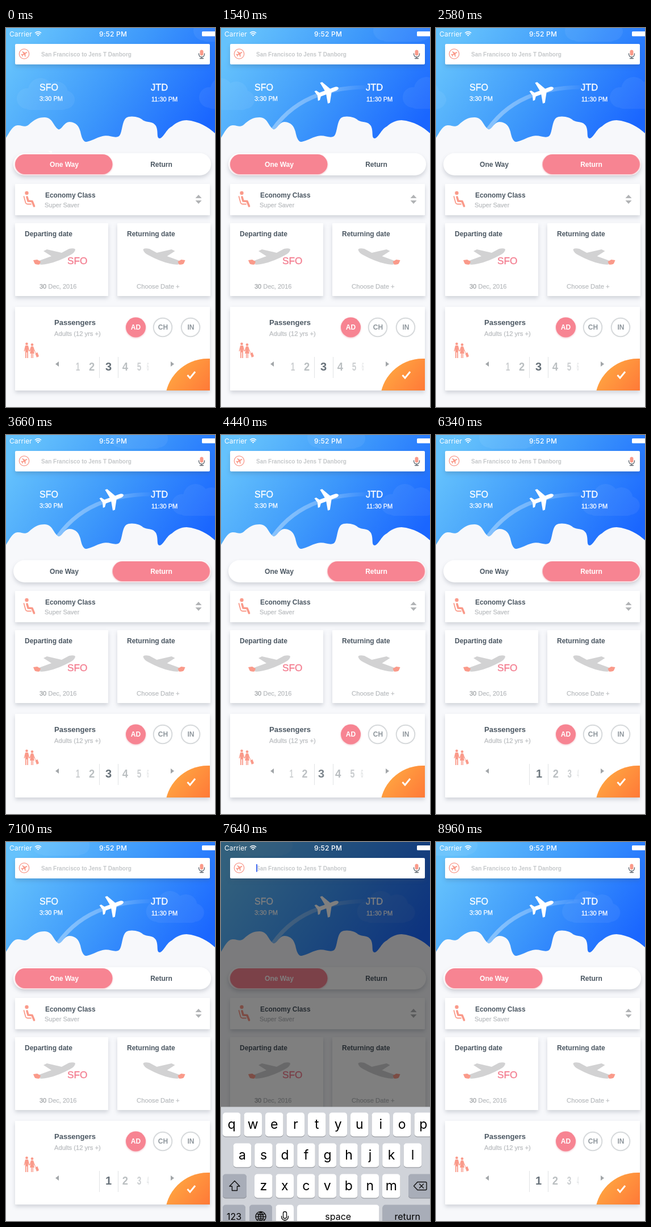
Recreate the animation shown at these times as an HTML page. Size 368 px wide and 666 px high, loop 8.98 s.

```html
<!DOCTYPE html>
<html lang="en">
<head>
<meta charset="utf-8">
<title>Flight booking</title>
<style>
@property --pos { syntax: "<number>"; inherits: true; initial-value: 3; }

html, body { margin: 0; width: 100%; height: 100%; overflow: hidden; background: #f7f8fb; }
svg { display: block; width: 368px; height: 666px; font-family: "Liberation Sans", Arial, sans-serif; }
text { white-space: pre; }

.b { font-weight: 700; }
.mid { text-anchor: middle; }
.dark { fill: #4b5762; }
.soft { fill: #b9bcbf; font-size: 11px; stroke: #b9bcbf; stroke-width: .25px; }
.salmon { fill: #fa9a8a; }
.pink { fill: #f78492; filter: drop-shadow(0 1px 1.5px rgba(220, 90, 110, .4)); }
.white { fill: #fff; }
.grey { fill: #d2d2d3; }
.card { fill: #fff; filter: drop-shadow(0 4px 3.5px rgba(60, 70, 90, .2)); }
.ui { font-family: Inter, Roboto, sans-serif; }
.line { fill: none; stroke-linecap: round; stroke-linejoin: round; }

.cloud, .plane, .trail, .knob, .one, .two, .wheel, .dim, .keys, .caret {
  animation: 8.98s linear infinite;
}
.cloud { fill: #fff; }
.near { animation-name: near; }
.far { animation-name: far; }
@keyframes near { to { transform: translateX(-360px); } }
@keyframes far { to { transform: translateX(-118px); } }

.plane {
  offset-path: path("M79 199Q130 101 265 104");
  offset-rotate: auto -5deg;
  animation-name: fly;
}
@keyframes fly {
  0% { offset-distance: 0%; animation-timing-function: cubic-bezier(.35, .1, .3, 1); }
  16.1%, 100% { offset-distance: 64%; }
}
.trail { stroke-dasharray: 100 200; animation-name: trail; }
@keyframes trail {
  0% { stroke-dashoffset: 101; animation-timing-function: cubic-bezier(.35, .1, .3, 1); }
  16.1%, 100% { stroke-dashoffset: 0; }
}

.knob { animation-name: slide; animation-timing-function: ease-in-out; }
.one { animation-name: one; }
.two { animation-name: two; }
@keyframes slide {
  0%, 23.4%, 78.5%, 100% { transform: none; }
  26.7%, 75.2% { transform: translateX(171.5px); }
}
@keyframes one {
  0%, 23.4%, 78.5%, 100% { fill: #fff; }
  26.7%, 75.2% { fill: #4b5762; }
}
@keyframes two {
  0%, 23.4%, 78.5%, 100% { fill: #4b5762; }
  26.7%, 75.2% { fill: #fff; }
}

.wheel { animation-name: spin; animation-timing-function: ease-out; }
@keyframes spin {
  0%, 47.9% { --pos: 3; animation-timing-function: ease-in-out; }
  54%, 60.1% { --pos: 4; }
  67% { --pos: .8; }
  72.5%, 100% { --pos: 1; }
}
.digit {
  --d: calc(var(--i) - var(--pos));
  --a: calc(var(--d) * 23.8deg);
  --on: max(0, 1 - 2 * max(var(--d), -1 * var(--d)));
  transform: translateX(calc(sin(var(--a)) * 73px)) scaleX(max(.01, cos(var(--a))));
  opacity: max(0, cos(var(--a)));
  fill: color-mix(in srgb, #68727a calc(var(--on) * 100%), #b4b9bc);
  font: 700 20px "Liberation Sans", Arial, sans-serif;
}

.dim { opacity: 0; animation-name: dim; }
@keyframes dim {
  0%, 82.3% { opacity: 0; animation-timing-function: ease-out; }
  85%, 94.9% { opacity: .5; }
  99%, 100% { opacity: 0; }
}
.keys { transform: translateY(667px); animation-name: rise; }
@keyframes rise {
  0%, 82.3% { transform: translateY(667px); animation-timing-function: cubic-bezier(.25, 1, .5, 1); }
  87.9%, 94.9% { transform: translateY(451px); animation-timing-function: cubic-bezier(.3, .5, .3, 1); }
  99.3%, 100% { transform: translateY(667px); }
}
.caret { opacity: 0; animation-name: blink; animation-timing-function: step-end; }
@keyframes blink {
  0%, 89.1%, 94.9%, 100% { opacity: 0; }
  82.6%, 93.3% { opacity: 1; }
}
.key { filter: drop-shadow(0 1px 0 #888b91); }
</style>
</head>
<body>
<svg viewBox="0 0 368 666">
  <defs>
    <linearGradient id="sky" x1="0" y1=".3" x2="1" y2=".7">
      <stop stop-color="#65c2fc"/><stop offset=".5" stop-color="#3d98fb"/><stop offset="1" stop-color="#1a66ff"/>
    </linearGradient>
    <linearGradient id="fade" gradientUnits="userSpaceOnUse" x1="90" y1="0" x2="265" y2="0">
      <stop stop-color="#fff" stop-opacity=".36"/><stop offset=".6" stop-color="#fff" stop-opacity=".25"/>
      <stop offset="1" stop-color="#fff" stop-opacity="0"/>
    </linearGradient>
    <linearGradient id="sun" gradientUnits="userSpaceOnUse" x1="295" y1="590" x2="355" y2="640">
      <stop stop-color="#ffa742"/><stop offset="1" stop-color="#ff7a38"/>
    </linearGradient>
    <clipPath id="corner"><rect x="16" y="490" width="343" height="147"/></clipPath>
    <g id="puff">
      <circle cx="18" cy="36" r="18"/><circle cx="42" cy="22" r="22"/><circle cx="70" cy="26" r="20"/>
      <circle cx="86" cy="38" r="16"/><rect x="12" y="30" width="80" height="26" rx="12"/>
    </g>
    <path id="jet" d="M22.500 0Q21.500-3.500 15-3.500H8L-1-19.500H-5L-2-3.500H-12L-16-9H-19.500L-17 0L-19.500 9H-16L-12 3.500H-2L-5 19.500H-1L8 3.500H15Q21.500 3.500 22.500 0Z"/>
    <g id="side">
      <path class="grey" d="M58 409L80 401L66 392L72 389L98 395L111 388Q121 386 122 389.500Q121 395 113 399Q93 410 75 414Q65 416.500 60 415.500Z"/>
      <path class="salmon" d="M48 408L55 407L61 410.500L59 415.500Q52 416.500 50 413Z"/>
    </g>
  </defs>

  <rect width="368" height="210" fill="url(#sky)"/>
  <g class="cloud near"><use href="#puff" x="19" y="88" opacity=".06"/></g>
  <g class="cloud near"><use href="#puff" x="330" y="-32" opacity=".06"/></g>
  <g class="cloud far"><use href="#puff" x="340" y="86" opacity=".06"/></g>
  <path class="line trail" pathLength="100" d="M79 199Q130 101 265 104" stroke="url(#fade)" stroke-width="7" style="stroke-linecap:butt"/>
  <g class="plane"><use href="#jet" class="white"/></g>
  <path fill="#f7f8fb" d="M0 193C6 184 11 172 20 171C28 170 33 176 40 170C50 161 56 157 68 157C82 157 83 172 92 178C98 180 102 165 112 165C124 166 128 172 131 182C133 192 136 201 142 200C152 198 158 193 170 190C182 187 192 195 199 190C206 184 203 158 216 156C226 154 238 158 241 162C250 167 258 163 264 172C269 182 264 194 271 194C278 192 282 178 292 173C300 166 308 162 318 162C340 164 356 174 368 185V216H0Z"/>

  <g class="white">
    <text x="59" y="110" font-size="16" stroke="#fff" stroke-width=".35">SFO</text>
    <text x="255" y="110" font-size="16.500" stroke="#fff" stroke-width=".35">JTD</text>
    <text x="59" y="128" font-size="11" stroke="#fff" stroke-width=".3">3:30 PM</text>
    <text x="256" y="129" font-size="11" stroke="#fff" stroke-width=".3">11:30 PM</text>
  </g>

  <rect class="card" x="13" y="220" width="348" height="39" rx="19.500"/>
  <rect class="knob pink" x="16" y="222" width="171.500" height="35" rx="17.500"/>
  <g class="b mid" font-size="12">
    <text class="one" x="102.500" y="244">One Way</text>
    <text class="two" x="273.500" y="244">Return</text>
  </g>

  <rect class="card" x="16" y="274" width="343" height="55" rx="1"/>
  <circle class="salmon" cx="36.500" cy="290" r="3.200"/>
  <g class="line" stroke="#fa9a8a">
    <path d="M37 297L39 304L46 304.500L49.500 313" stroke-width="3.600"/>
    <path d="M31.500 296L34.500 307Q35.500 309.500 38 309.500H44" stroke-width="1.800"/>
  </g>
  <text class="b dark" x="69" y="298" font-size="11.900">Economy Class</text>
  <text class="soft" x="68" y="315">Super Saver</text>
  <path fill="#b1b3b5" d="M333.500 299L339 293L344.500 299ZM333.500 303H344.500L339 309Z"/>

  <rect class="card" x="16" y="343" width="164" height="128" rx="1"/>
  <rect class="card" x="196" y="343" width="164" height="128" rx="1"/>
  <g class="b dark" font-size="12">
    <text x="33" y="366">Departing date</text>
    <text x="213" y="366">Returning date</text>
  </g>
  <use href="#side"/>
  <use href="#side" transform="translate(363.500 0) scale(-1 1)"/>
  <text x="108" y="415" font-size="17.200" fill="#f37b8e" stroke="#f37b8e" stroke-width=".3">SFO</text>
  <text class="soft" x="59" y="458"><tspan fill="#9a9ea1" stroke="#9a9ea1">30</tspan> Dec, 2016</text>
  <text class="soft" x="230" y="458" style="font-size:11.300px">Choose Date +</text>

  <rect class="card" x="16" y="490" width="343" height="147" rx="1"/>
  <text class="b dark" x="85" y="522" font-size="13">Passengers</text>
  <text class="soft" x="85" y="540.500" style="font-size:11.200px">Adults (12 yrs +)</text>
  <circle class="pink" cx="228.500" cy="526" r="17.500"/>
  <g fill="none" stroke="#d6d9db" stroke-width="2">
    <circle cx="276" cy="526" r="16.300"/><circle cx="325" cy="526" r="16.300"/>
  </g>
  <g class="b mid" font-size="12">
    <text class="white" x="228.500" y="530">AD</text>
    <g fill="#8f979d"><text x="276.500" y="530">CH</text><text x="325.500" y="530">IN</text></g>
  </g>
  <g class="salmon">
    <circle cx="36.500" cy="555" r="2.300"/>
    <path d="M34 558H39L41.500 568H40L39 564V580H37.200V570H35.800V580H34V564L33 568H31.500Z"/>
    <circle cx="46" cy="556.500" r="2.300"/>
    <path d="M44 559.500H48L51 568H49.500L48 564L50 572H48V580H46.600V572H45.400V580H44V572H42L44 564L42.500 568H41Z"/>
    <path d="M51.500 572L55.500 570L58 577L54 579Z"/>
    <path class="line" d="M50 567L53 572" stroke="#fa9a8a"/>
  </g>
  <path fill="#a2a6a9" d="M93 586V595L87 590.500ZM290 586V595L296 590.500Z"/>
  <path stroke="#e0e3e5" d="M164.500 578V615M197.500 578V615"/>
  <g transform="translate(180.500 602)"><g class="wheel mid" id="wheel"></g></g>
  <circle cx="355" cy="656" r="75" fill="url(#sun)" clip-path="url(#corner)"/>
  <path class="line" d="M319.500 610L324 615L333 604" stroke="#fff" stroke-width="3" style="stroke-linecap:butt;stroke-linejoin:miter"/>

  <rect class="dim" width="368" height="666"/>

  <g class="ui white" font-size="12">
    <text x="6" y="14.500" letter-spacing=".1">Carrier</text>
    <text class="mid" x="188.500" y="14.500" font-weight="500" letter-spacing=".2">9:52 PM</text>
    <rect x="345" y="6" width="26" height="8.500" rx="1.500"/>
    <path class="line" d="M51.500 8.500Q56.500 4.500 61.500 8.500M53.300 10.800Q56.500 8.300 59.700 10.800" stroke="#fff" stroke-width="1.600"/>
    <path d="M54.700 12.500Q56.500 11 58.300 12.500L56.500 14.500Z"/>
  </g>

  <rect class="card" x="16" y="28" width="343" height="36" rx="2"/>
  <circle cx="32" cy="45.500" r="8.700" fill="none" stroke="#f8988a" stroke-width="1.300"/>
  <use href="#jet" class="salmon" transform="translate(32 45.500) rotate(-30) scale(.28)"/>
  <text class="b" x="62" y="50" font-size="10" fill="#c5c8ca">San Francisco to Jens T Danborg</text>
  <rect class="caret" x="62" y="39" width="2" height="13.500" fill="#426bf2"/>
  <rect class="salmon" x="341.500" y="38.500" width="6" height="10" rx="3"/>
  <path class="line" d="M339.500 45V46Q340 51 344.500 51Q349 51 349.500 46V45M344.500 51V53.500M341.500 53.500H347.500" stroke="#59616a" stroke-width="1.300"/>

  <g class="keys ui mid" id="keys">
    <rect width="368" height="220" fill="#d0d3d9"/>
  </g>
</svg>
<script>
const NS = "http://www.w3.org/2000/svg";
const keys = document.getElementById("keys");
const wheel = document.getElementById("wheel");

function add(parent, tag, attrs, label = "") {
  const el = document.createElementNS(NS, tag);
  for (const name in attrs) el.setAttribute(name, attrs[name]);
  el.textContent = label;
  parent.append(el);
}

function key(x, y, width, label, size, fill = "#fff") {
  add(keys, "rect", { class: "key", x, y, width, height: 42, rx: 5, fill });
  add(keys, "text", { x: x + width / 2, y: y + (size > 20 ? 28.5 : 26.5), "font-size": size }, label);
}

function icon(d) {
  add(keys, "path", { class: "line", d, stroke: "#111", "stroke-width": 1.4 });
}

for (let i = 1; i < 10; i++) add(wheel, "text", { class: "digit", style: `--i:${i}` }, i);

[["qwertyuiop", 3], ["asdfghjkl", 21.7], ["zxcvbnm", 59]].forEach(([row, x], r) =>
  [...row].forEach((c, i) => key(x + i * 37.5, 10 + r * 54, 31.5, c, 23)));

const grey = "#a8adb8";
key(3, 118, 42, "", 16, grey);
key(330, 118, 42, "", 16, grey);
key(3, 172, 40, "123", 16, grey);
key(50, 172, 40, "", 16, grey);
key(96.5, 172, 31.5, "", 16);
key(134, 172, 144.5, "space", 16);
key(284.5, 172, 87.5, "return", 16, grey);

icon("M24 130L33 139.500H28.500V147H19.500V139.500H15Z");
icon("M339.500 139L346 132H360Q362 132 362 134V144Q362 146 360 146H346ZM349.500 135.500L356.500 142.500M356.500 135.500L349.500 142.500");
icon("M61 193a9 9 0 1 0 18 0a9 9 0 1 0-18 0M61 193H79M70 184V202M70 184Q61 193 70 202M70 184Q79 193 70 202M63 188Q70 191 77 188M63 198Q70 195 77 198");
icon("M109.500 187a3 3 0 0 1 6 0V193a3 3 0 0 1-6 0ZM106.500 192Q106.500 199 112.500 199Q118.500 199 118.500 192M112.500 199V202M109.500 202H115.500");
</script>
</body>
</html>
```
